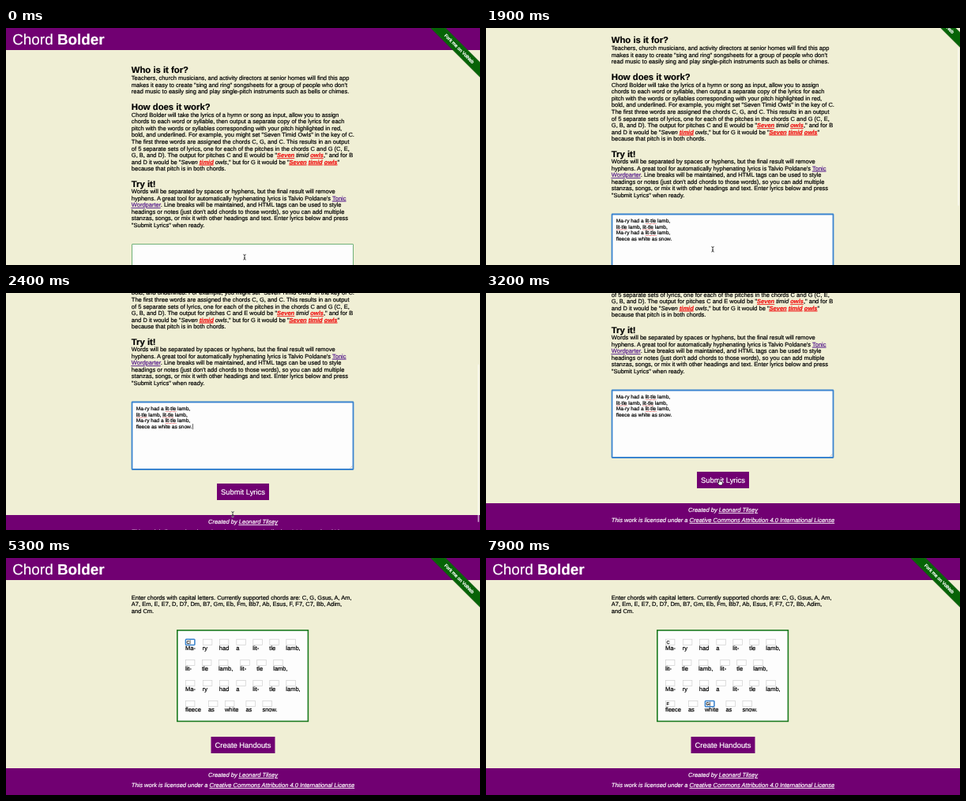
An HTML page for the animation above (8000 ms loop, 600x301 px).

```html
<!DOCTYPE html>
<html lang="en">
<head>
<meta charset="utf-8">
<title>Chord Bolder</title>
<style>
  html, body { margin: 0; width: 100%; height: 100%; overflow: hidden; background: #f0efd5; }
  svg { display: block; width: 600px; height: 301px; }
  text {
    font: 7.5px "Liberation Sans", Arial, sans-serif; text-rendering: geometricPrecision;
    color: #000; fill: currentColor; stroke: currentColor; stroke-width: .2px;
  }
  tspan { fill: currentColor; stroke: currentColor; }
  .title { font-size: 18.9px; }
  .head { font-size: 11.3px; font-weight: bold; }
  .lyric { font-size: 6.55px; }
  .chord { font-size: 5.5px; }
  .fork { font-size: 5.9px; stroke-width: .3px; }
  .button { font-size: 9.375px; }
  .white { color: #fff; }
  .mid { text-anchor: middle; }
  .b { font-weight: bold; }
  .i { font-style: italic; }
  .u { text-decoration: underline; }
  .hit { font-weight: bold; font-style: italic; color: #f01010; text-decoration: underline; }
  .link { color: #551a8b; text-decoration: underline; }
</style>
</head>
<body>
<svg id="stage" viewBox="0 0 600 301" xmlns="http://www.w3.org/2000/svg"></svg>
<script>
const LOOP = 8000, STEP = 100;
const PURPLE = '#710072', GREEN = '#1b7a1f', PALE_GREEN = '#6fb077', BLUE = '#3a84cf';
const LEFT = 158.8, LEAD = 8.54;
const PAGE_HEIGHT = 452;

const text = (x, y, s, cls = '') => `<text x="${x}" y="${y}" class="${cls}">${s}</text>`;
const rect = (x, y, w, h, attrs) => `<rect x="${x}" y="${y}" width="${w}" height="${h}" ${attrs}/>`;
const span = (cls, s) => `<tspan class="${cls}">${s}</tspan>`;
const hit = s => span('hit', s);
const lines = (y, list, lead = LEAD, x = LEFT, cls = '') =>
  list.map((s, n) => text(x, y + n * lead, s, cls)).join('');

const header = rect(0, 0, 600, 28, `fill="${PURPLE}"`) +
  text(8.2, 20.7, 'Chord ' + span('b', 'Bolder'), 'title white');

const stitch = y => `<path d="M-50 ${y}H50" stroke="#fff" stroke-opacity=".3" stroke-width=".4" stroke-dasharray=".5 .6"/>`;
const ribbon = `<g transform="translate(573.5 26.5) rotate(45)">` +
  rect(-60, -7, 120, 14, 'fill="#000" opacity=".25"') +
  rect(-60, -6.7, 120, 13.4, 'fill="#066306"') +
  stitch(-5.9) + stitch(5.9) +
  text(0, 1.7, 'Fork me on VolNeb', 'fork white mid') + '</g>';

const button = (y, w, label) => rect(300 - w / 2, y, w, 21, `fill="${PURPLE}"`) +
  text(300, y + 13.9, label, 'button white mid');

const footer = y => rect(0, y, 600, 34, `fill="${PURPLE}"`) +
  text(300, y + 11.2, 'Created by ' + span('u', 'Leonard Tilsey'), 'white i mid') +
  text(300, y + 24, 'This work is licensed under a ' +
    span('u', 'Creative Commons Attribution 4.0 International License'), 'white i mid');

const about =
  text(LEFT, 57, 'Who is it for?', 'head') +
  lines(66.4, [
    'Teachers, church musicians, and activity directors at senior homes will find this app',
    'makes it easy to create "sing and ring" songsheets for a group of people who don\'t',
    'read music to easily sing and play single-pitch instruments such as bells or chimes.'
  ]) +
  text(LEFT, 104, 'How does it work?', 'head') +
  lines(112.8, [
    'Chord Bolder will take the lyrics of a hymn or song as input, allow you to assign',
    'chords to each word or syllable, then output a separate copy of the lyrics for each',
    'pitch with the words or syllables corresponding with your pitch highlighted in red,',
    'bold, and underlined. For example, you might set "Seven Timid Owls" in the key of C.',
    'The first three words are assigned the chords C, G, and C. This results in an output',
    'of 5 separate sets of lyrics, one for each of the pitches in the chords C and G (C, E,',
    `G, B, and D). The output for pitches C and E would be "${hit('Seven')}${span('i', ' timid ')}${hit('owls')}," and for B`,
    `and D it would be "${span('i', 'Seven ')}${hit('timid')}${span('i', ' owls')}," but for G it would be "${hit('Seven')} ${hit('timid')} ${hit('owls')}"`,
    'because that pitch is in both chords.'
  ]) +
  text(LEFT, 201.7, 'Try it!', 'head') +
  lines(210.2, [
    'Words will be separated by spaces or hyphens, but the final result will remove',
    `hyphens. A great tool for automatically hyphenating lyrics is Talvio Poldane's ${span('link', 'Tonic')}`,
    `${span('link', 'Wordparter')}. Line breaks will be maintained, and HTML tags can be used to style`,
    'headings or notes (just don\'t add chords to those words), so you can add multiple',
    'stanzas, songs, or mix it with other headings and text. Enter lyrics below and press',
    '"Submit Lyrics" when ready.'
  ]);

const VERSE_Y = 285.4, VERSE_LEAD = 7.45;
const squiggle = ([x, n]) => `<path d="M${x} ${VERSE_Y + n * VERSE_LEAD + 1.2}h13.8" stroke="#e33" stroke-width=".7" stroke-dasharray=".8 .5"/>`;
const verse = lines(VERSE_Y, [
    'Ma-ry had a lit-tle lamb,', 'lit-tle lamb, lit-tle lamb,',
    'Ma-ry had a lit-tle lamb,', 'fleece as white as snow.'
  ], VERSE_LEAD, 164.7, 'lyric') +
  [[201.7, 0], [164.7, 1], [198.1, 1], [201.7, 2]].map(squiggle).join('');

const area = rect(159.5, 274.5, 280, 85.5, 'id="area" fill="#fdfdfd" rx=".5"') +
  `<path d="M435.5 358.5l3-3M437.3 358.5l1.2-1.2" stroke="#999" stroke-width=".5"/>` +
  `<g id="verse">${verse}</g>` + rect(0, 0, .6, 7, 'id="areaCaret"');

// Each word sits below its chord field.
const rows = ['Ma- ry had a lit- tle lamb,', 'lit- tle lamb, lit- tle lamb,',
  'Ma- ry had a lit- tle lamb,', 'fleece as white as snow.'].map(s => s.split(' '));
const words = rows.flatMap((row, n) => row.map(s => text(0, 116.6 + n * 26.25, s))).join('');

const beam = 'M-1.7-3.3Q0-3.3 0-2V2Q0 3.3 1.7 3.3M1.7-3.3Q0-3.3 0-2M0 2Q0 3.3-1.7 3.3';
const pointers =
  `<g id="bar" fill="none"><path d="${beam}" stroke="#fff" stroke-opacity=".7" stroke-width="1.5"/>` +
  `<path d="${beam}M-.9.9H.9" stroke="#111" stroke-width=".75"/></g>` +
  `<path id="arrow" d="M-1-3.4V3.2L.6 1.8 1.8 4.4 3 3.9 1.9 1.4H4Z" fill="#000" stroke="#fff" stroke-width=".5"/>` +
  `<path id="hand" d="M-1.2-3.2Q-.5-4 .1-3.2V-.8L3-.1Q3.8.2 3.5 1.5L2.8 4H-.8L-3 .9Q-2.6 0-1.2 1Z" fill="#fff" stroke="#000" stroke-width=".6"/>`;

const $ = id => document.getElementById(id);
$('stage').innerHTML =
  rect(0, 0, 600, 301, 'fill="#f0efd5"') +
  `<g id="intro">${about}${area}${button(378, 66, 'Submit Lyrics')}${footer(418)}</g>` +
  `<g id="form">` +
  lines(52.9, [
    'Enter chords with capital letters. Currently supported chords are: C, G, Gsus, A, Am,',
    'A7, Em, E, E7, D, D7, Dm, B7, Gm, Eb, Fm, Bb7, Ab, Esus, F, F7, C7, Bb, Adim,',
    'and Cm.'
  ]) +
  rect(216.8, 91.8, 165.6, 115.6, `fill="#fdfdfd" stroke="${GREEN}" stroke-width="1.6"`) +
  `<g id="words">${words}</g><g id="fields"></g><g id="ring">` +
  rect(0, 0, 11.5, 7.2, `fill="none" stroke="${BLUE}" stroke-width="1.5" rx=".8"`) +
  rect(0, 0, .6, 5.2, 'id="caret"') + '</g>' +
  button(227, 81, 'Create Handouts') + footer(267) + '</g>' +
  `<g id="top">${header}${ribbon}</g>` +
  rect(597, 0, 2, 301 * 301 / PAGE_HEIGHT, 'id="thumb" rx="1" fill="#fff" opacity=".5"') +
  `<g id="pointer">${pointers}</g>`;

const wordNodes = [...$('words').children];
const fields = [];
rows.forEach((row, n) => {
  let x = 226.9;
  row.forEach(() => {
    const node = wordNodes[fields.length];
    node.setAttribute('x', x);
    fields.push({ x: x + .5, y: 103.2 + n * 26.1 });
    x += Math.max(12, node.getComputedTextLength()) + 9;
  });
});
$('fields').innerHTML = fields.map(f =>
  rect(f.x, f.y, 11.5, 7.2, 'fill="#fff" stroke="#cfcfcf" stroke-width=".7"') +
  text(f.x + 1.2, f.y + 5.6, '', 'chord')).join('');
const chordNodes = [...$('fields').querySelectorAll('text')];

// Times in ms.
const FOCUS_AREA = 700, PASTE = 1300, SUBMIT = 3300;
const scrollKeys = [[0, 0], [1700, 0], [1800, 13], [1900, 38], [2100, 88], [2250, 116], [2400, 136], [2500, 146], [2600, 151]];
const pointerKeys = [
  [0, 302, 291, 'bar'], [300, 302, 291, 'bar'], [800, 287, 281, 'bar'],
  [2600, 287, 281, 'arrow'], [3000, 296, 240, 'hand'], [3400, 296, 240, 'arrow'],
  [4000, 238, 130, 'arrow'], [4200, 238, 130, 'arrow'], [4500, 233, 107, 'bar'],
  [5100, 233, 107, ''], [5600, 233, 107, 'arrow'], [6100, 233, 185, 'bar'], [6600, 233, 185, '']
];
const focusKeys = [[4600, 0], [6200, 20], [7000, 21], [7200, 22]];
const typed = [[5100, 0, 'C'], [6600, 20, 'F'], [7500, 22, 'G']];

const lastKey = (keys, t) => keys.filter(k => k[0] <= t).pop();
const show = (id, on) => { $(id).style.display = on ? '' : 'none'; };
const move = (id, x, y) => $(id).setAttribute('transform', `translate(${x} ${y})`);
const blink = age => age % 1000 < 500;

function tween(keys, t, col, ease = p => p) {
  const a = lastKey(keys, t), b = keys[keys.indexOf(a) + 1] || a;
  const p = a === b ? 0 : (t - a[0]) / (b[0] - a[0]);
  return a[col] + (b[col] - a[col]) * ease(p);
}
const smooth = p => p * p * (3 - 2 * p);

function drawIntro(t) {
  const focused = t >= FOCUS_AREA, pasted = t >= PASTE;
  $('area').setAttribute('stroke', focused ? BLUE : PALE_GREEN);
  $('area').setAttribute('stroke-width', focused ? 1.8 : 1);
  show('verse', pasted);
  show('areaCaret', focused && blink(t - (pasted ? PASTE : FOCUS_AREA)));
  move('areaCaret', pasted ? 236 : 164.7, pasted ? 302.2 : 279.8);
}

function drawForm(t) {
  chordNodes.forEach((node, n) => {
    const entry = typed.find(k => k[1] === n && k[0] <= t);
    node.textContent = entry ? entry[2] : '';
  });
  const focus = lastKey(focusKeys, t);
  show('ring', focus);
  if (!focus) return;
  const field = fields[focus[1]];
  const entry = typed.find(k => k[1] === focus[1] && k[0] <= t);
  move('ring', field.x, field.y);
  move('caret', entry ? 1.4 + chordNodes[focus[1]].getComputedTextLength() : 1.3, 1);
  show('caret', blink(t - (entry || focus)[0]));
}

function draw(t) {
  const first = t < SUBMIT;
  const scroll = first ? tween(scrollKeys, t, 1) : 0;
  show('intro', first);
  show('form', !first);
  move('intro', 0, -scroll);
  move('top', 0, -scroll);
  show('thumb', t >= 1700 && t < 3000);
  move('thumb', 0, scroll * 301 / PAGE_HEIGHT);
  if (first) drawIntro(t); else drawForm(t);

  const kind = lastKey(pointerKeys, t)[3];
  ['bar', 'arrow', 'hand'].forEach(id => show(id, id === kind));
  move('pointer', tween(pointerKeys, t, 1, smooth), tween(pointerKeys, t, 2, smooth));
}

const start = performance.now();
function tick() {
  const t = (performance.now() - start) % LOOP;
  draw(Math.floor(t / STEP) * STEP);
  requestAnimationFrame(tick);
}
tick();
</script>
</body>
</html>
```
